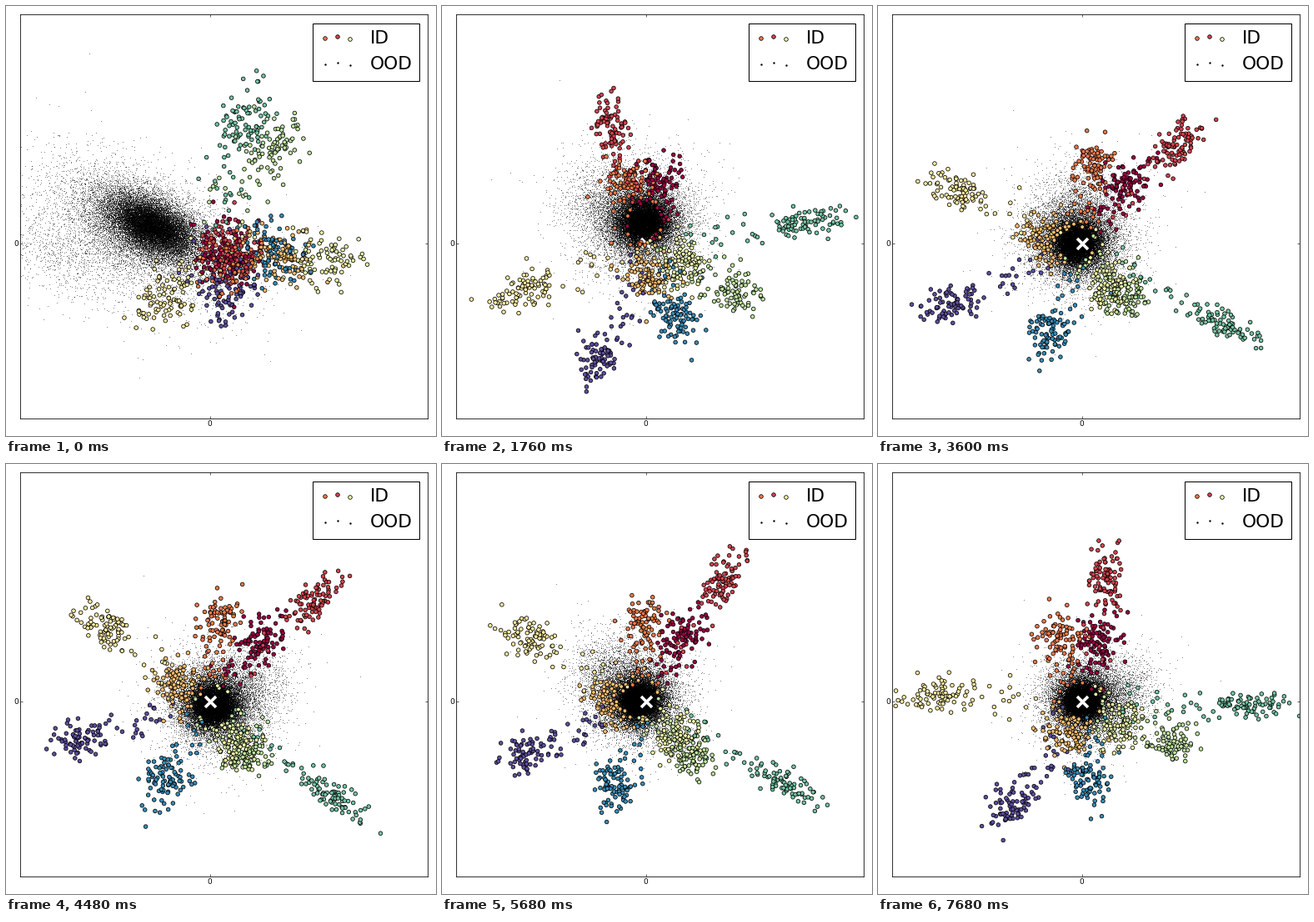
A matplotlib script that plays this animation: 516x516 px, repeating every 8000 ms.

```python
import numpy as np
import matplotlib.pyplot as plt
from matplotlib.animation import FuncAnimation
from matplotlib.patches import Rectangle

SIZE, DPI = 516, 100
FRAMES, INTERVAL = 100, 80
LAST_MOVE = 96                    # the picture rests after this frame
STEPS = 5                         # frames per training epoch
FIRST, FORMED, SETTLED = -0.5, 4, 17
EPOCHS = 21
PT = 72 / DPI                     # points per pixel
ORIGIN = np.array([245.0, 284.5])
N_ID, N_OOD = 98, 30000
rng = np.random.default_rng(7)

# Each class travels between three polar key points (degrees, pixels):
# untrained start, formed star, star at its widest swing.
CLASSES = np.array([
    [(-40, 25), (80, 84), (50, 100)],
    [(-25, 25), (97, 155), (42, 175)],
    [(-45, 40), (120, 82), (80, 92)],
    [(-10, 95), (-82, 40), (-210, 42)],
    [(231, 88), (193, 168), (145, 162)],
    [(-8, 145), (-25, 47), (-60, 62)],
    [(57, 138), (-24, 118), (-60, 73)],
    [(74, 152), (6, 190), (-41, 188)],
    [(-10, 80), (-72, 98), (-117, 118)],
    [(-70, 62), (247, 145), (197, 165)],
], dtype=float)
N_CLASS = len(CLASSES)

# Path of the cloud core and the heading of its loose tail.
CLOUD_EPOCH = [-0.5, 4, 6, 8.5, 10.75, 13.75, 18.75]
CLOUD_X = [176, 242, 221, 238, 248, 236, 244]
CLOUD_Y = [264, 259, 268, 285, 290, 284, 284]
CLOUD_HEADING = [200, 150, 130, 80, 30, 130, 15]


def polar(angle, reach):
    rad = np.radians(angle)
    return np.stack([np.cos(rad), -np.sin(rad)], axis=-1) * np.expand_dims(reach, -1)


def untrained(u):
    return (1 - np.clip((u - FIRST) / (FORMED - FIRST), 0, 1)) ** 3


def swing(u):
    return np.sin(np.pi * np.clip((u - FORMED) / 14, 0, 1))


def per_epoch(u, values):
    """Linear blend between the values of neighbouring epochs."""
    i = min(int(np.floor(u)) + 1, EPOCHS - 2)
    a = u + 1 - i
    return (1 - a) * values[i] + a * values[i + 1]


def core_at(u):
    return np.array([np.interp(u, CLOUD_EPOCH, CLOUD_X),
                     np.interp(u, CLOUD_EPOCH, CLOUD_Y)])


# A dense clump at the tip of each arm and a sparse trail towards the middle.
clump = rng.normal(1, 0.10, (N_CLASS, N_ID))
trail = rng.uniform(0.2, 0.95, (N_CLASS, N_ID))
along = np.where(rng.random((N_CLASS, N_ID)) < 0.25, trail, clump)
across = rng.normal(0, 0.9, (N_CLASS, N_ID, 2))
along_noise = rng.normal(0, 0.05, (EPOCHS, N_CLASS, N_ID))
across_noise = rng.normal(0, 0.4, (EPOCHS, N_CLASS, N_ID, 2))
turn_noise = rng.normal(0, 4, (EPOCHS, N_CLASS))
reach_noise = rng.normal(1, 0.04, (EPOCHS, N_CLASS))
order = rng.permutation(N_CLASS * N_ID)

# Parts of the cloud: core, halo, tail.
part = rng.choice(3, N_OOD, p=[0.72, 0.25, 0.03])
part_size = np.array([1, 1.8, 1.6])[part, None]
part_shift = np.array([0, 8, 55])[part, None]
cloud = rng.normal(0, 0.9, (N_OOD, 2)) * np.exp(rng.normal(0, 0.25, (N_OOD, 1)))
cloud_noise = rng.normal(0, 0.3, (EPOCHS, N_OOD, 2))


def id_points(u):
    u = min(u, SETTLED)
    early, s = untrained(u), swing(u)
    start, formed, wide = CLASSES.transpose(1, 2, 0)
    angle, reach = (1 - s) * formed + s * wide
    angle = angle + per_epoch(u, turn_noise)
    reach = reach * per_epoch(u, reach_noise)
    tip = early * polar(*start) + (1 - early) * polar(angle, reach)

    spread = 16 - 0.03 * np.hypot(*tip.T) + 5 * early
    t = along + per_epoch(u, along_noise)
    jitter = across + per_epoch(u, across_noise)
    pts = ORIGIN + tip[:, None] * t[..., None] + jitter * spread[:, None, None]

    # Trained classes keep clear of the cloud core.
    core = core_at(u)
    off = pts.reshape(-1, 2) - core
    dist = np.linalg.norm(off, axis=1, keepdims=True) + 1e-6
    return (core + off * np.hypot(dist, 20 * (1 - early)) / dist)[order]


def ood_points(u):
    early = untrained(u)
    size = 18 - 0.24 * max(u - FORMED, 0)
    local = cloud + per_epoch(u, cloud_noise)
    local = local * part_size * size * [1 + 0.8 * early, 0.92]
    tilt = np.radians(27 * early)
    c, s = np.cos(tilt), np.sin(tilt)
    heading = np.interp(u, CLOUD_EPOCH, CLOUD_HEADING)
    tail = polar(heading, 1 + early) * part_shift
    return (core_at(u) + tail + local @ np.array([[c, s], [-s, c]])).T


fig = plt.figure(figsize=(SIZE / DPI, SIZE / DPI), dpi=DPI, facecolor="white")
left, right, top, bottom = 17, 506, 10, 495
ax = fig.add_axes([left / SIZE, 1 - bottom / SIZE,
                   (right - left) / SIZE, (bottom - top) / SIZE])
ax.set(xlim=(left, right), ylim=(bottom, top),
       xticks=[ORIGIN[0]], yticks=[ORIGIN[1]])
ax.tick_params(direction="in", top=True, right=True, length=3 * PT, width=0.6 * PT,
               labelbottom=False, labelleft=False)
for spine in ax.spines.values():
    spine.set_linewidth(0.8 * PT)

plt.rcParams["font.family"] = "DejaVu Sans"
ax.text(12, 284.5, "0", size=9 * PT, ha="center", va="center_baseline")
ax.text(244.5, 504, "0", size=9 * PT, ha="center", va="baseline")

colors = plt.get_cmap("Spectral")(np.linspace(0, 1, N_CLASS))
dot = dict(s=(4.6 * PT) ** 2, edgecolors="black", linewidths=0.75 * PT)
ood, = ax.plot([], [], "o", color="black", ms=1.0 * PT, mew=0, alpha=0.6, zorder=2)
ax.plot(*ORIGIN, "x", color="white", ms=13 * PT, mew=3.6 * PT, zorder=3)
ids = ax.scatter(np.zeros(len(order)), np.zeros(len(order)),
                 c=np.repeat(colors, N_ID, axis=0)[order], zorder=4, **dot)

# Legend
ax.add_patch(Rectangle((368, 21), 128, 69, fc="white", ec="black", lw=1 * PT, zorder=5))
sample_x, sample_y = np.array([383, 398, 413]), np.array([39, 37, 40])
ax.scatter(sample_x, sample_y, c=colors[[2, 1, 5]], zorder=6, **dot)
ax.scatter(sample_x, sample_y + 31, c="black", s=(2.4 * PT) ** 2, linewidths=0, zorder=6)
for label, base in (("ID", 45), ("OOD", 76)):
    ax.text(436.5, base, label, size=21.6 * PT, va="baseline", zorder=6)


def update(frame):
    u = FIRST + (min(frame, LAST_MOVE) - 0) / 4
    epoch, step = divmod(min(frame, LAST_MOVE) - 3, STEPS)
    u = epoch + step / (STEPS - 1)
    ood.set_data(*ood_points(u))
    ids.set_offsets(id_points(u))
    return ood, ids


anim = FuncAnimation(fig, update, frames=FRAMES, interval=INTERVAL,
                     init_func=lambda: update(0), repeat=True, repeat_delay=0)
plt.show()
```
